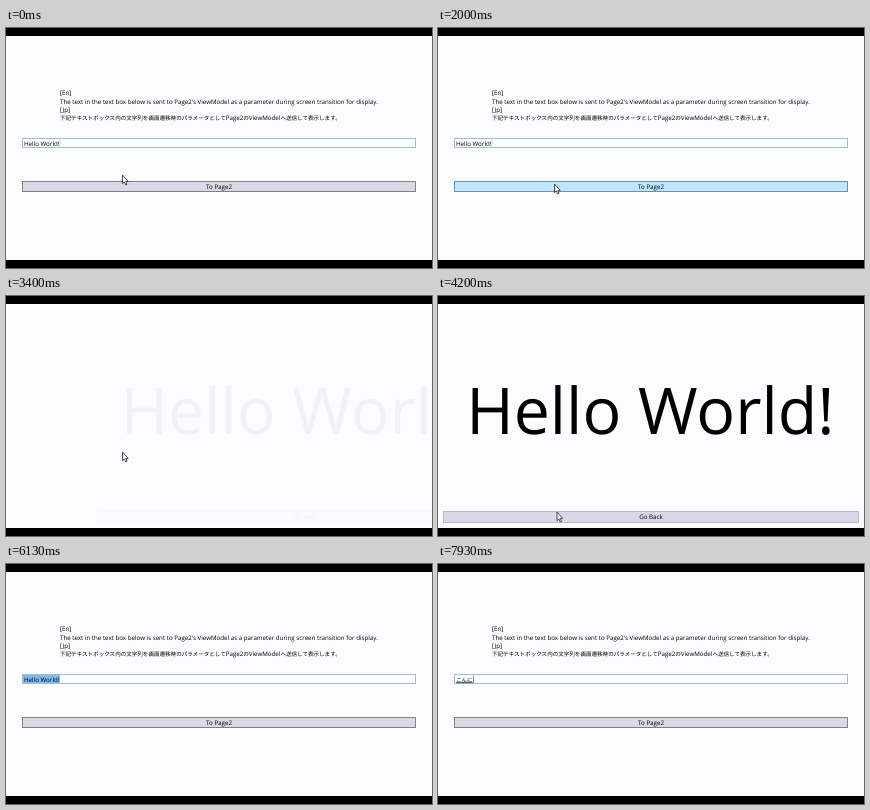
An HTML page with a canvas that plays this animation: 426x240 px, repeating every 8000 ms.

```html
<!DOCTYPE html>
<html lang="en">
<head>
<meta charset="utf-8">
<title>Page transition</title>
<style>
  html, body { margin: 0; width: 100%; height: 100%; overflow: hidden; background: #000; }
  canvas { display: block; width: 426px; height: 240px; }
</style>
</head>
<body>
<canvas width="426" height="240"></canvas>
<script>
const ctx = document.querySelector('canvas').getContext('2d');
const LOOP = 8000;
const TO_PAGE2 = 3390, GO_BACK = 4600;
const SLIDE = { distance: 90, duration: 800 };
const DRAG = { start: 5650, end: 6000 };
const FIELD = { x: 16, y: 110, w: 394, h: 10 };
const LATIN = '"Open Sans", "Noto Sans", sans-serif';
const CJK = '"Noto Sans CJK JP", "Noto Sans CJK", sans-serif';

// time, x, y of the pointer
const POINTER = [
  [1000, 116, 147], [1400, 116, 156], [3650, 116, 156], [4100, 118.5, 216],
  [4250, 118.5, 216], [4400, 118, 221], [4850, 118, 221], [5350, 75, 137],
  [5430, 75, 137], [DRAG.start, 54, 115], [DRAG.end, 16, 115], [6100, -8, 116]
];

// time and field content while the input method composes
const TYPING = [
  [6900, 'ｋ'], [7050, 'こ'], [7250, 'こｎ'], [7400, 'こん'], [7650, 'こんｎ'], [7800, 'こんに']
];

const clamp = v => Math.max(0, Math.min(1, v));
const smooth = v => v * v * (3 - 2 * v);
const easeOut = v => 1 - (1 - v) ** 3;

function pointerAt(t) {
  const next = POINTER.findIndex(p => p[0] > t);
  if (next < 0) return { x: -8, y: 116 };
  if (next === 0) return { x: POINTER[0][1], y: POINTER[0][2] };
  const [t0, x0, y0] = POINTER[next - 1], [t1, x1, y1] = POINTER[next];
  const k = smooth((t - t0) / (t1 - t0));
  return { x: x0 + (x1 - x0) * k, y: y0 + (y1 - y0) * k };
}

// Draws mixed Latin and Japanese text and returns its right edge.
function write(text, x, y) {
  ctx.fillStyle = '#000';
  for (const run of text.match(/[ -~]+|[^ -~]+/g) || []) {
    ctx.font = /^[ -~]/.test(run) ? `6.2px ${LATIN}` : `5.55px ${CJK}`;
    ctx.fillText(run, x, y);
    x += ctx.measureText(run).width;
  }
  return x;
}

function box(x, y, w, h, fill, border) {
  ctx.fillStyle = fill;
  ctx.fillRect(x, y, w, h);
  ctx.strokeStyle = border;
  ctx.lineWidth = 1;
  ctx.strokeRect(x + 0.5, y + 0.5, w - 1, h - 1);
}

function inside(p, x, y, w, h) {
  return p.x > x && p.x < x + w && p.y > y && p.y < y + h;
}

function button(label, x, y, w, h, border, pointer) {
  const hover = inside(pointer, x, y + 1, w, h);
  box(x, y, w, h, hover ? '#bee6fd' : '#d9d8e8', hover ? '#5f94b2' : border);
  ctx.textAlign = 'center';
  ctx.font = `6.2px ${LATIN}`;
  ctx.fillStyle = '#000';
  ctx.fillText(label, 213, y + h / 2 + 2.4);
  ctx.textAlign = 'left';
}

function field(t) {
  const focused = t < TO_PAGE2 || t >= DRAG.start;
  box(FIELD.x, FIELD.y, FIELD.w, FIELD.h, '#fefefe', focused ? '#9cc0dc' : '#c8c8bc');

  const composed = TYPING.filter(step => step[0] <= t).pop();
  if (t >= DRAG.start && !composed) {
    const left = 54 - 37 * smooth(clamp((t - DRAG.start) / (DRAG.end - DRAG.start)));
    ctx.fillStyle = '#7fbcee';
    ctx.fillRect(left, 111, 54 - left, 8);
  }
  const end = write(composed ? composed[1] : 'Hello World!', 18, 117.6);
  if (composed) ctx.fillRect(18, 118.4, end - 18, 0.7);
  const caretOn = (t + 200) % 1060 < 530;
  ctx.fillStyle = composed ? '#333' : '#a9bccd';
  if (composed || (t < TO_PAGE2 && caretOn)) ctx.fillRect(end + 0.3, 111.5, 0.6, 7.5);
}

function page1(t, pointer) {
  write('[En]', 54, 67);
  write("The text in the text box below is sent to Page2's ViewModel as a parameter during screen transition for display.", 54, 75.6);
  write('[Jp]', 54, 84);
  write('下記テキストボックス内の文字列を画面遷移時のパラメータとしてPage2のViewModelへ送信して表示します。', 54, 92.4);
  field(t);
  button('To Page2', 16, 153, 394, 11, '#85856f', pointer);
}

function page2(t, pointer) {
  ctx.font = `64.4px ${LATIN}`;
  ctx.fillStyle = '#000';
  ctx.fillText('Hello World!', 28.2, 137.5);
  button('Go Back', 5, 215, 416, 12, '#b9b9c4', pointer);
}

function slideIn(t, start, page, pointer) {
  const k = clamp((t - start) / SLIDE.duration);
  ctx.save();
  ctx.globalAlpha = easeOut(k);
  ctx.translate(SLIDE.distance * (1 - easeOut(k)), 0);
  page(t, pointer);
  ctx.restore();
}

function drawPointer(p, overField) {
  ctx.save();
  ctx.translate(p.x, p.y);
  ctx.lineWidth = 0.8;
  ctx.strokeStyle = '#222';
  ctx.fillStyle = '#fff';
  const shape = new Path2D(overField
    ? 'M-1.5-4H1.5M0-4V4M-1.5 4H1.5'
    : 'M.5 0V8.6L2.4 6.9L3.7 9.9L5 9.3L3.8 6.4H6.2Z');
  if (!overField) ctx.fill(shape);
  ctx.stroke(shape);
  ctx.restore();
}

function render(t) {
  const pointer = pointerAt(t);
  const onPage2 = t >= TO_PAGE2 && t < GO_BACK;
  ctx.fillStyle = '#000';
  ctx.fillRect(0, 0, 426, 240);
  ctx.fillStyle = '#fcfcfe';
  ctx.fillRect(0, 8, 426, 224);
  ctx.textRendering = 'geometricPrecision';

  if (t < TO_PAGE2) page1(t, pointer);
  else if (onPage2) slideIn(t, TO_PAGE2, page2, pointer);
  else slideIn(t, GO_BACK, page1, pointer);

  const overField = !onPage2 && inside(pointer, FIELD.x, FIELD.y, FIELD.w, FIELD.h);
  if (pointer.x > -8) drawPointer(pointer, overField);
}

function tick() {
  render(performance.now() % LOOP);
  requestAnimationFrame(tick);
}
tick();
</script>
</body>
</html>
```
